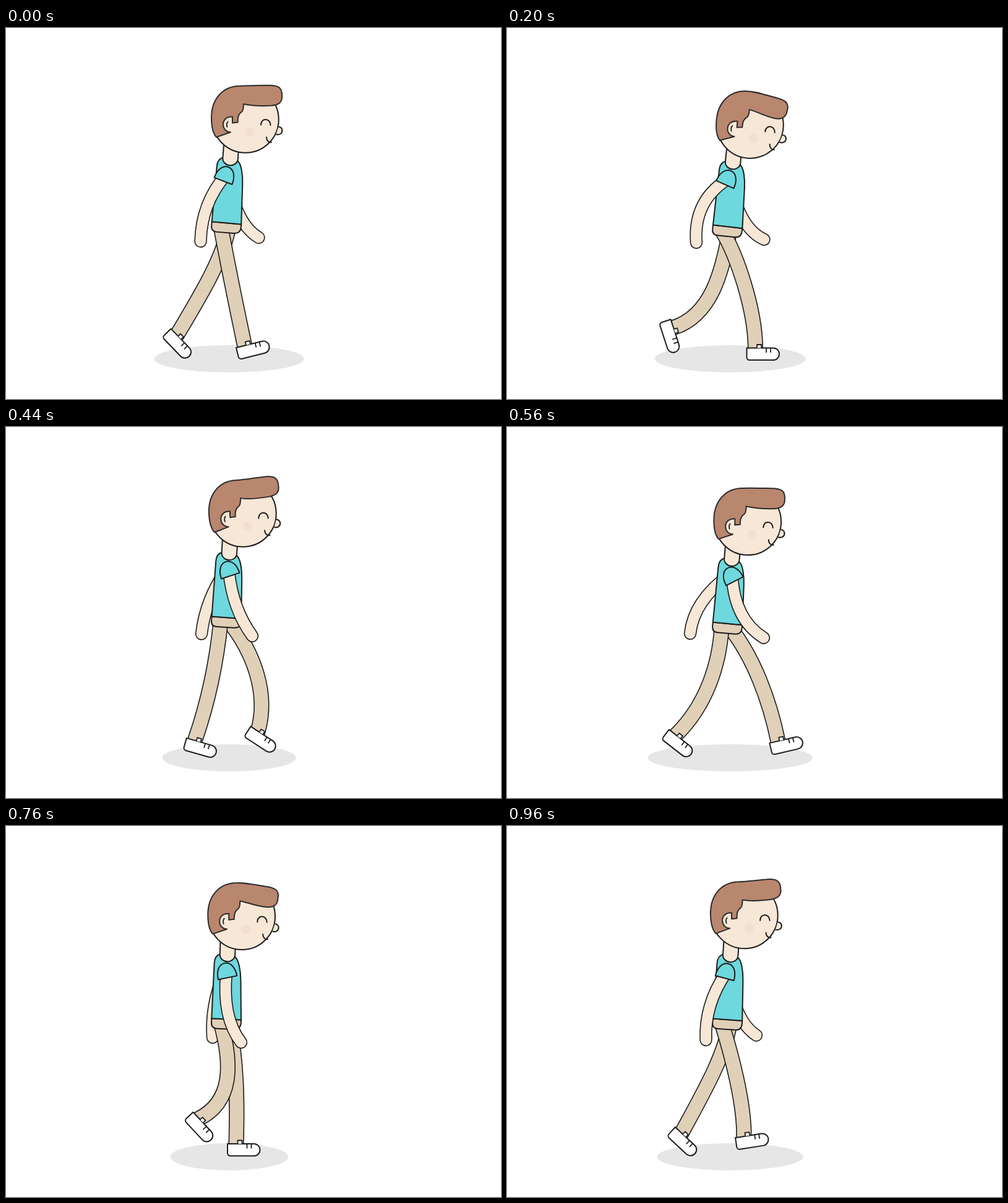
Write an HTML page with a canvas that moves like this. It is 800 by 600 pixels and loops after 1000 ms.

```html
<!DOCTYPE html>
<html lang="en">
<head>
<meta charset="utf-8">
<title>Walk cycle</title>
<style>
  html, body { margin: 0; width: 100%; height: 100%; overflow: hidden; background: #fff; }
  canvas { display: block; width: 800px; height: 600px; }
</style>
</head>
<body>
<canvas id="stage" width="800" height="600"></canvas>
<script>
const g = document.getElementById('stage').getContext('2d');
const LOOP = 1000, STEP = 40;
const INK = '#1d1d1d', SKIN = '#f7e7d6', HAIR = '#b9866e', SHIRT = '#6dd8de', PANTS = '#e0d0b8';

// time, pelvis bottom, lean, head x, head y, head tilt, quiff tilt, shadow radius
const BODY = [
  [0, 331, 4.5, 387, 148, 0, 0, 121],
  [120, 338, 5.8, 393, 158.5, 3.5, 6, 138],
  [200, 337, 5.8, 393, 157, 4.5, 11, 122],
  [280, 326, 2.6, 384, 143.5, 1.2, 9, 87],
  [380, 320, 2, 379, 134, -3, 0, 97],
  [440, 324, 3.6, 383, 140, -2.2, -4, 108],
  [580, 335, 5, 390, 155, 1.5, 2, 135],
  [680, 337, 4.6, 390, 157, 4.5, 11, 120],
  [780, 326, 1.5, 379, 143.5, -1, 8, 92],
  [840, 322, 0, 374, 137, -4.5, 2, 106],
  [880, 320.5, .8, 375.5, 135, -4, -2, 110],
  [960, 329, 3.8, 384, 144.5, -1, -3, 118]
];

// time, ankle x, ankle y, foot tilt, thigh control, shin control
const NEAR_LEG = [
  [0, 385.6, 513.6, -14, 359, 385, 372, 449],
  [110, 413, 516.5, -4, 368, 380, 401, 450],
  [200, 401.5, 517.5, 0, 372, 368, 401, 455],
  [280, 348.5, 513.5, 0, 348, 380, 349.5, 450],
  [440, 305.3, 507, 16, 340, 385, 325, 450],
  [560, 273, 498, 38, 343, 385, 322, 450],
  [680, 292.5, 489.7, 42, 352, 390, 348, 460],
  [760, 312, 473, 47, 366, 386, 366, 446],
  [840, 354, 467.4, 36, 384, 371, 393, 424],
  [960, 382.8, 502, -9, 363, 370, 384, 450]
];
const FAR_LEG = [
  [0, 276.3, 496.5, 46, 352, 370, 316, 430],
  [110, 262, 492, 60, 348, 384, 318, 452],
  [200, 269, 484.6, 72, 348, 395, 330, 465],
  [280, 286.4, 464.6, 71, 364, 395, 336, 455],
  [360, 342, 469, 58, 386, 380, 386, 438],
  [440, 407.2, 492, 33, 399, 363, 425, 429],
  [560, 438, 508, -13, 398, 372, 424, 440],
  [680, 422, 514.5, -2, 397, 378, 428, 440],
  [760, 372, 514, 0, 373, 379, 374, 446],
  [840, 324.4, 506, 17, 349, 377, 337, 441],
  [960, 282.2, 496.6, 43, 352, 372, 318, 430]
];

// time, hand, elbow control, sleeve tilt
const NEAR_ARM = [
  [0, 314.5, 345, 316, 284, 21],
  [120, 300, 345, 297, 279, 26],
  [200, 306, 347, 301, 280, 24],
  [280, 345, 346.5, 341, 294, 5],
  [360, 380, 345, 352, 297, -8],
  [440, 398, 338, 366, 294, -18],
  [560, 415, 341, 368, 312, -27],
  [680, 410, 347, 365, 317, -26],
  [760, 380, 350, 349, 310, -12],
  [840, 344.5, 344.5, 333, 297, 2],
  [960, 321.5, 346, 319, 289, 15]
];
const FAR_ARM = [
  [0, 408.5, 339, 371, 317],
  [120, 417, 340, 374, 322],
  [200, 415.5, 342, 374, 323],
  [280, 377, 342.5, 362, 290],
  [360, 342, 341, 338, 285],
  [440, 316, 334.5, 322, 280],
  [560, 296, 334, 302, 281],
  [680, 298, 336.5, 300, 284],
  [760, 334, 342, 330, 290],
  [840, 373, 339, 354, 290],
  [960, 403, 338.5, 367, 315]
];

const P = d => new Path2D(d);
const SHAPE = {
  shoe: P('M-14 0H28.7a9.8 9.8 0 0 1 0 19.6H-9.5a4.5 4.5 0 0 1-4.5-4.5Z'),
  tab: P('M2.5 0V-5.5H9.5V0'),
  laces: P('M17.5 0V7.5M24.5 0V7.5'),
  pelvis: P('M-24-8V-1Q-24 8-14 8H13Q23.7 8 23.7-3V-7.5Z'),
  shirt: P('M-24-8L-23-98C-23-106-20-111-13-113L10-109C16-105 20-88 20.7-72L23.7-7.5Z'),
  neck: P('M-14.5-140V-112a12.2 11 0 0 0 24.5 0V-140'),
  sleeve: P('M-15.5 20C-15.5 5-9-4 0-4C9-4 15.5 5 15.5 20Z'),
  nose: P('M53.3 12C57 11.5 59.5 14.5 59.5 18C59.5 22.5 55 25.5 49.5 24'),
  eye: P('M25 8.7C25-3 40-3 40.5 9'),
  mouth: P('M34 28.5C34 34 37.5 37.3 42 36.7'),
  innerEar: P('M-28.5 3.5Q-31.5 7-29.5 12')
};

// periodic cubic through the rows of a table
function sample(rows, t) {
  const n = rows.length;
  const at = i => {
    const turn = Math.floor(i / n), r = rows[i - turn * n];
    return [r[0] + turn * LOOP, r];
  };
  let i = n - 1;
  while (rows[i][0] > t) i--;
  const [[ta, a], [tb, b], [tc, c], [td, d]] = [i - 1, i, i + 1, i + 2].map(at);
  const h = tc - tb, u = (t - tb) / h, u2 = u * u, u3 = u2 * u;
  return b.slice(1).map((v, k) => {
    const w = c[k + 1];
    const m0 = (w - a[k + 1]) / (tc - ta) * h;
    const m1 = (d[k + 1] - v) / (td - tb) * h;
    return v * (2 * u3 - 3 * u2 + 1) + m0 * (u3 - 2 * u2 + u) + w * (3 * u2 - 2 * u3) + m1 * (u3 - u2);
  });
}

function turn(x, y, deg) {
  const r = deg * Math.PI / 180, c = Math.cos(r), s = Math.sin(r);
  return [x * c - y * s, x * s + y * c];
}

function place(x, y, deg, draw) {
  g.save();
  g.translate(x, y);
  g.rotate(deg * Math.PI / 180);
  draw();
  g.restore();
}

function paint(path, fill, width = 2, ink = INK) {
  if (fill) { g.fillStyle = fill; g.fill(path); }
  g.strokeStyle = ink;
  g.lineWidth = width;
  g.stroke(path);
}

function tube(path, width, fill, cap) {
  g.lineCap = cap;
  paint(path, null, width + 1.6);
  paint(path, null, width - 1.6, fill);
  g.lineCap = 'butt';
}

function leg(x, y, [ax, ay, tilt, ...ctrl]) {
  const p = new Path2D();
  p.moveTo(x, y);
  p.bezierCurveTo(...ctrl, ax, ay);
  const [dx, dy] = turn(0, 3, tilt);
  p.lineTo(ax + dx, ay + dy);
  tube(p, 23.6, PANTS, 'butt');
  place(ax, ay, tilt, () => {
    paint(SHAPE.shoe, '#fff');
    paint(SHAPE.tab, '#fff', 1.8);
    paint(SHAPE.laces, null, 1.8);
  });
}

function arm(x, y, [hx, hy, qx, qy]) {
  const p = new Path2D();
  p.moveTo(x, y);
  p.quadraticCurveTo(qx, qy, hx, hy);
  tube(p, 18.8, SKIN, 'round');
}

function hair(tilt) {
  const p = new Path2D();
  const front = (x, y) => {
    const [dx, dy] = turn(x + 4, y + 40, tilt);
    return [dx - 4, dy - 40];
  };
  p.moveTo(-47, 28.5);
  p.bezierCurveTo(-52, 23, -55, 11, -55, -3);
  p.bezierCurveTo(-55, -33, -37, -54, -9, -54.3);
  p.bezierCurveTo(4, -54.8, ...front(18, -55), ...front(36, -55.3));
  p.bezierCurveTo(...front(54, -56), ...front(59, -51), ...front(59, -40));
  p.lineTo(...front(59, -35));
  p.bezierCurveTo(...front(58, -27), ...front(53, -23.5), ...front(42, -22.5));
  p.bezierCurveTo(...front(26, -21.5), 10, -22.3, -3, -25);
  p.bezierCurveTo(-3.5, -20, -3, -15, -6, -12.5);
  p.bezierCurveTo(-11, -9, -12.5, -5, -12.5, 4.5);
  p.lineTo(-21, 5.5);
  p.lineTo(-21, -4.5);
  p.bezierCurveTo(-31, -5, -36, 1, -36, 8);
  p.bezierCurveTo(-36, 15, -31, 20.3, -24, 20.5);
  p.closePath();
  paint(p, HAIR, 2, '#2b2b2b');
}

function disc(x, y, rx, ry, fill) {
  g.beginPath();
  g.ellipse(x, y, rx, ry, 0, 0, 2 * Math.PI);
  g.fillStyle = fill;
  g.fill();
}

function head(quiff) {
  const face = new Path2D();
  face.arc(0, 0, 53.7, 0, 2 * Math.PI);
  paint(face, SKIN);
  disc(7, 20.5, 7.6, 7.6, '#f2dfd2');
  paint(SHAPE.nose, SKIN);
  g.lineCap = 'round';
  paint(SHAPE.eye);
  paint(SHAPE.mouth);
  hair(quiff);
  paint(SHAPE.innerEar, null, 1.8);
  g.lineCap = 'butt';
}

function draw(t) {
  const [base, lean, hx, hy, tilt, quiff, shade] = sample(BODY, t);
  const px = 356, py = base - 8;
  const [nx, ny] = turn(-2.5, -101, lean);
  const sx = px + nx - 3.3, sy = py + ny + 6.6;
  const near = sample(NEAR_ARM, t), swing = near[4];

  g.fillStyle = '#fff';
  g.fillRect(0, 0, 800, 600);
  g.lineJoin = 'round';
  disc(360.7, 535, shade, 22, '#e6e6e6');

  arm(sx, sy + 8, sample(FAR_ARM, t));
  leg(360, base - 10, sample(FAR_LEG, t));
  leg(347, base - 10, sample(NEAR_LEG, t));
  place(px, py, lean, () => {
    paint(SHAPE.pelvis, PANTS);
    paint(SHAPE.shirt, SHIRT);
    paint(SHAPE.neck, SKIN);
  });
  place(hx, hy, tilt, () => head(quiff));

  const [dx, dy] = turn(0, 11, swing);
  arm(sx + dx, sy + dy, near);
  place(sx, sy, swing, () => paint(SHAPE.sleeve, SHIRT));
}

function tick() {
  const t = performance.now() % LOOP;
  draw(Math.floor(t / STEP) * STEP);
  requestAnimationFrame(tick);
}
tick();
</script>
</body>
</html>
```
